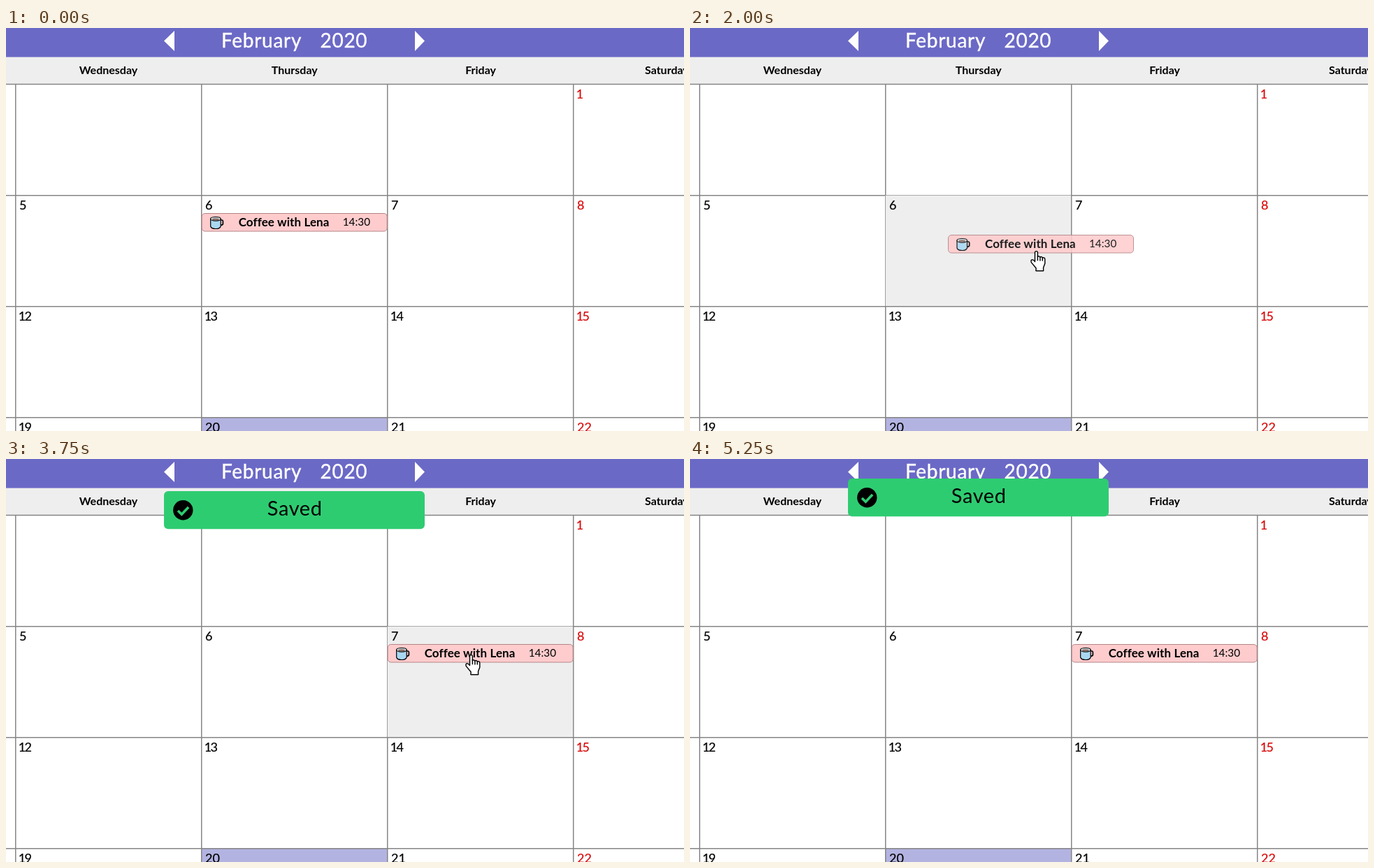
Recreate the animation shown at these times as an HTML page. Size 970 px wide and 577 px high, loop 5.5 s.

```html
<!DOCTYPE html>
<html lang="en">
<head>
<meta charset="utf-8">
<title>Calendar drag and drop</title>
<style>
  html, body { margin: 0; width: 100%; height: 100%; overflow: hidden; background: #fff; }
  svg { display: block; width: 970px; height: 577px; font-family: Lato, "Open Sans", sans-serif; }
  .month { font-size: 28px; letter-spacing: .7px; fill: #fff; stroke: #fff; stroke-width: .4px; }
  .weekday { font-size: 16px; font-weight: 700; text-anchor: middle; }
  .day { font-size: 18px; stroke: #000; stroke-width: .2px; }
  .red { fill: #d80c0c; stroke: #d80c0c; }
  .teen { letter-spacing: -1.7px; }
  .title { font-size: 17px; font-weight: 700; letter-spacing: .1px; }
  .time { font-size: 15.3px; }
  .saved { font-size: 29px; letter-spacing: .6px; text-anchor: middle; }
  .ink { stroke: #000; stroke-linejoin: round; stroke-linecap: round; }
</style>
</head>
<body>
<svg viewBox="0 0 970 577">
  <rect width="970" height="577" fill="#fff"/>
  <rect y="41" width="970" height="40" fill="#eee"/>
  <rect width="970" height="41.6" fill="#6b69c6"/>
  <path d="M226 18.5 241 4V33ZM599 18.5 585 4V33Z" fill="#fff"/>
  <text class="month" x="308" y="27.5">February</text>
  <text class="month" x="449.5" y="27.5">2020</text>
  <rect x="279" y="557" width="267" height="20" fill="#b3b3e2"/>
  <g id="grid" stroke="#858585" stroke-width="1.5"></g>
  <rect id="hover" width="265.3" height="158.3" fill="#eee"/>
  <g id="labels"></g>

  <g id="event">
    <rect x=".5" y=".5" width="265" height="25.5" rx="4.5" fill="#ffcccd" stroke="#b58385"/>
    <g class="ink" stroke-width="1.2">
      <path d="M27.5 10h2q1.2 0 1.2 1.8v3.4q0 1.8-3.2 2.2" fill="none" stroke-width="1.7"/>
      <path d="M13 8V19q1 3.5 7.2 3.5t7.3-3.5V8Z" fill="#a9d8f3"/>
      <ellipse cx="20.2" cy="8.3" rx="7.3" ry="2.8" fill="#d5e5ec"/>
    </g>
    <ellipse cx="20.2" cy="8.8" rx="5" ry="1.5" fill="#8a6c62"/>
    <text class="title" x="53" y="18.5">Coffee with Lena</text>
    <text class="time" x="202" y="18.2">14:30</text>
  </g>

  <g id="toast">
    <rect x="226" width="373" height="54.2" rx="6" fill="#2ecc71"/>
    <circle cx="253.3" cy="27.3" r="14.2"/>
    <path d="M246 28l5.3 5.2 9.8-10.2" fill="none" stroke="#2ecc71" stroke-width="3.6"/>
    <text class="saved" x="413.2" y="34.8">Saved</text>
  </g>

  <g id="point" class="ink" fill="#fff" stroke-width="1.1">
    <g transform="scale(1.3)">
      <path d="M5 12V2q0-1.5 1.5-1.5T8 2V6.3q1.4-1 2.7.6 1.6-.8 2.6.7 2.7-.4 2.7 1.7V14l-1.7 4.5V22H6.2V19L1 12.8Q.2 10 2 9.7q1.4 0 3 2.3Z"/>
      <path d="M8 6v4.5M10.7 7v3.7M13.3 7.8v3M6.2 22h8.1" fill="none"/>
    </g>
  </g>
  <g id="palm" class="ink" fill="#fff" stroke-width="1.4">
    <path d="M7.5 21.5V19L1 13q-.5-2 1.2-2.5 1.8 0 3.8 2.3L3.5 6q-.1-2.3 2-2.3 1.3.2 1.8 1.8l1.2 3-.7-5Q7.7 1.5 9.5 1.3q1.4 0 1.8 1.7Q11.5.5 13.3.6q1.9.2 1.8 2.4l-.1 2q.6-2 2.3-1.7 1.6.5 1.4 2.4L18.3 8q.8-1.4 2-.8 1.2.6.9 2.2L19 16.5v5Z"/>
    <path d="M8.5 8l.6 3M11.4 3l.6 7.5M15 4.5v6M18.3 8l-.6 3" fill="none"/>
  </g>
</svg>
<script>
const LOOP = 5500;
const colX = c => 13.75 + 266 * c;
const rowY = r => 80.6 + 159.05 * r;
const el = id => document.getElementById(id);

function add(parent, tag, attrs, text = "") {
  const node = document.createElementNS("http://www.w3.org/2000/svg", tag);
  for (const key in attrs) node.setAttribute(key, attrs[key]);
  node.textContent = text;
  el(parent).append(node);
}

for (let i = 0; i < 4; i++) {
  add("grid", "path", { d: `M${colX(i)} 81V577M0 ${rowY(i)}H970` });
}

["Wednesday", "Thursday", "Friday", "Saturday"].forEach((name, c) => {
  add("labels", "text", { class: "weekday", x: 146.5 + 266.3 * c, y: 65.7 }, name);
  for (let r = 0; r < 4; r++) {
    const day = c - 2 + 7 * r;
    if (day < 1) continue;
    const style = "day" + (c === 3 ? " red" : "") + (day > 9 && day < 20 ? " teen" : "");
    const shift = String(day)[0] === "1" ? 4 : 5.3;
    add("labels", "text", { class: style, x: colX(c) + shift, y: rowY(r) + 20.7 }, day);
  }
});

// Each step changes only the listed parts; at = cursor, cell = [column, row].
const steps = [
  { t: 0, at: null, cell: null, event: [279.7, 265], drag: false, palm: false, toast: null },
  { t: 250, at: [456, 470], cell: [1, 2] },
  { t: 500, at: [432, 378], cell: [1, 1] },
  { t: 750, at: [391, 290] },
  { t: 1000, at: [391, 283] },
  { t: 1500, at: [393, 290], palm: true },
  { t: 1750, at: [417, 306], palm: false, event: [300, 276], drag: true },
  { t: 2000, at: [487, 319], event: [369, 296] },
  { t: 2250, at: [568, 306], event: [451, 286], cell: [2, 1] },
  { t: 2500, at: [624, 285], event: [506, 265] },
  { t: 2750, at: [646, 279], event: [531, 260] },
  { t: 3000, at: [652, 279], event: [539, 260] },
  { t: 3250, at: [656, 280], event: [544, 261] },
  { t: 3500, at: [657, 280], event: [546, 262] },
  { t: 3750, event: [545.7, 265], drag: false, toast: 46 },
  { t: 4000, toast: 42 },
  { t: 4250, toast: 28 },
  { t: 4500, at: [640, 331] },
  { t: 4750, at: [590, 440], cell: [2, 2] },
  { t: 5000, at: [537, 546], cell: [1, 3] },
  { t: 5250, at: null, cell: null }
];

function place(id, pos) {
  const node = el(id);
  node.style.display = pos ? "" : "none";
  if (pos) node.setAttribute("transform", `translate(${pos})`);
}

function draw(time) {
  const s = Object.assign({}, ...steps.filter(step => step.t <= time));
  place("hover", s.cell && [colX(s.cell[0]), rowY(s.cell[1])]);
  place("event", s.event);
  el("event").style.opacity = s.drag ? .88 : 1;
  place("toast", s.toast === null ? null : [0, s.toast]);
  place("point", s.palm ? null : s.at);
  place("palm", s.palm ? s.at : null);
}

const start = performance.now();
function tick() {
  draw((performance.now() - start) % LOOP);
  requestAnimationFrame(tick);
}
tick();
</script>
</body>
</html>
```
